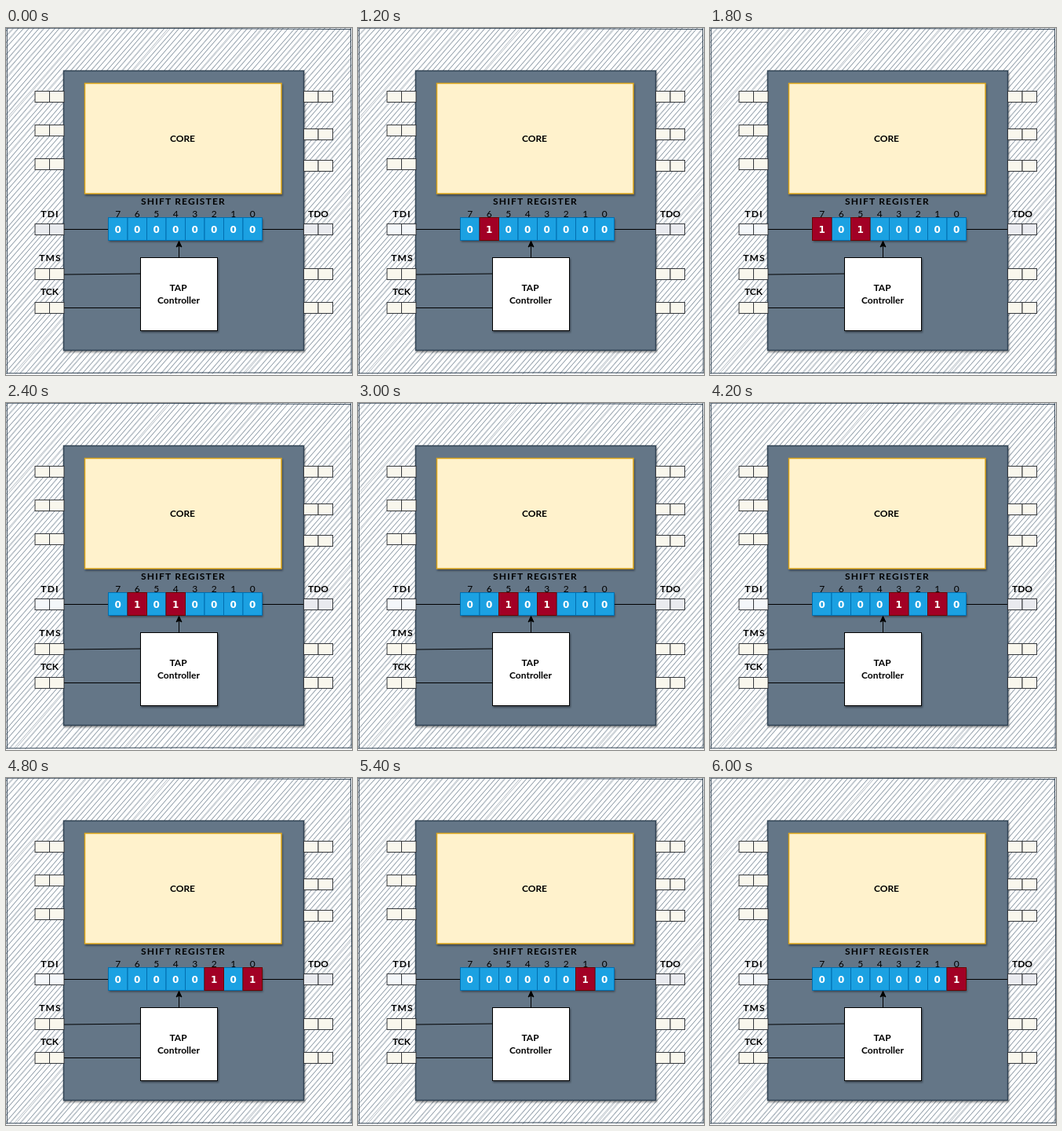
An HTML page that plays this animation: 441x442 px, repeating every 6.6 s.

```html
<!DOCTYPE html>
<html lang="en">
<head>
<meta charset="utf-8">
<title>Shift register</title>
<style>
  html, body { margin: 0; width: 100%; height: 100%; overflow: hidden; background: #fff; }
  svg { display: block; width: 441px; height: 442px; }
  text { font: 700 12px Lato, "Open Sans", sans-serif; text-anchor: middle; }
  .wide { letter-spacing: 1.2px; }
  .index { font-weight: 400; }
  .value { font: 700 12px "DejaVu Sans", sans-serif; fill: #fff; }
  .shadow { filter: drop-shadow(1px 2px 1px rgba(0, 0, 0, .4)); }
  .hatch { fill: none; stroke: #647687; stroke-width: .5; }
  .border { fill: none; stroke: #314354; stroke-width: 1; }
  .wire { fill: none; stroke: #000; }
  .pin { fill: #f9f7ed; stroke: #36393d; }
  .port { fill: #e9eaef; }
  .input { animation: lighten 6.6s step-end infinite; }
  .zero { fill: #1ba1e2; stroke: #006eaf; }
  .one { fill: #a20025; stroke: #6f0000; }
  .bit { visibility: hidden; animation: pulse 6.6s step-end infinite; }
  @keyframes lighten {
    0% { fill: #e8eaee; }
    9.0909%, 100% { fill: #f4f7fa; }
  }
  /* Two ones enter, 1.2 s apart; each cell repeats them one step later. */
  @keyframes pulse {
    0%, 18.1818%, 36.3636%, 100% { visibility: hidden; }
    9.0909%, 27.2727% { visibility: visible; }
  }
</style>
</head>
<body>
<svg id="stage" viewBox="0 0 441 442" xmlns="http://www.w3.org/2000/svg"></svg>
<script>
  const NS = "http://www.w3.org/2000/svg";
  const stage = document.getElementById("stage");

  function add(tag, attrs, parent = stage) {
    const node = document.createElementNS(NS, tag);
    for (const key in attrs) node.setAttribute(key, attrs[key]);
    return parent.appendChild(node);
  }
  const box = (x, y, width, height, attrs, parent) =>
    add("rect", { x, y, width, height, ...attrs }, parent);
  const path = (d, cls, attrs = {}) => add("path", { d, class: cls, ...attrs });
  function label(x, y, str, cls = "", parent) {
    add("text", { x, y, class: cls }, parent).textContent = str;
  }

  let seed = 17;
  function jitter(amount) {
    seed = (seed * 16807) % 2147483647;
    return (seed / 2147483647 * 2 - 1) * amount;
  }

  function sketchLine(x1, y1, x2, y2) {
    const mx = (x1 + x2) / 2 + jitter(1.2), my = (y1 + y2) / 2 + jitter(1.2);
    const pt = (x, y) => `${(x + jitter(.9)).toFixed(1)} ${(y + jitter(.9)).toFixed(1)}`;
    return `M${pt(x1, y1)}Q${pt(mx, my)} ${pt(x2, y2)}`;
  }

  function drawHatch() {
    const slope = Math.tan(49 * Math.PI / 180);
    const step = 5 / Math.sin(49 * Math.PI / 180);
    let d = "";
    // x is where the line meets the bottom edge
    for (let x = -440 / slope + 3; x < 440; x += step) {
      const x1 = Math.max(x, 0), x2 = Math.min(x + 440 / slope, 440);
      const y = px => 440 - (px - x) * slope;
      for (let i = 0; i < 2; i++) d += sketchLine(x1, y(x1), x2, y(x2));
    }
    path(d, "hatch");
  }

  function drawBorder() {
    let d = "";
    const corners = [[.7, .9], [440, .9], [440, 440], [.7, 440]];
    corners.forEach((p, i) => {
      d += sketchLine(...p, ...corners[(i + 1) % 4]);
    });
    path(d, "border");
  }

  function pin(x, y, cls = "") {
    for (const dx of [0, 18.5]) box(x + dx, y, 18.5, 14, { class: "pin " + cls });
  }

  function cell(x, kind, digit, parent) {
    box(x, 241.5, 24.5, 29, { class: kind }, parent);
    label(x + 12.25, 260.7, digit, "value", parent);
  }

  drawHatch();
  drawBorder();

  box(73.5, 54.5, 306, 356, { fill: "#647687", stroke: "#314354", "stroke-width": 1.5, class: "shadow" });
  box(100.5, 70.5, 250.5, 140.5, { fill: "#fff2cc", stroke: "#dda61c", "stroke-width": 1.5, class: "shadow" });
  label(225, 145, "CORE");
  label(226, 225, "SHIFT REGISTER", "wide");

  [80.5, 123.5, 166.5, 306.5, 349.5].forEach(y => pin(37, y));
  [80.5, 128.5, 168.5, 306.5, 349.5].forEach(y => pin(379.5, y));
  pin(37, 249.5, "port input");
  pin(379.5, 249.5, "port");

  label(56, 241, "TDI", "wide");
  label(398, 241, "TDO");
  label(56.5, 297, "TMS", "wide");
  label(55.5, 340, "TCK");

  path("M74 256.5H130M327 256.5H379M74 314L172 313M74 356.5H172", "wire");

  box(171.5, 292.5, 98, 93, { fill: "#fff", stroke: "#000", class: "shadow" });
  label(219.5, 335, "TAP");
  label(220, 351, "Controller");

  box(130.5, 241.5, 196, 29, { fill: "#1ba1e2", class: "shadow" });
  for (let i = 0; i < 8; i++) {
    const x = 130.5 + i * 24.5;
    label(x + 12.25, 241, 7 - i, "index");
    cell(x, "zero", 0);
  }
  for (let i = 0; i < 8; i++) {
    const bit = add("g", { class: "bit", style: `animation-delay:${i * 600 - 6600}ms` });
    cell(130.5 + i * 24.5, "one", 1, bit);
  }

  path("M220.5 292V277", "wire");
  path("M220.5 271.5L224 279L220.5 277.3L217 279Z", "wire", { style: "fill:#000" });
</script>
</body>
</html>
```
